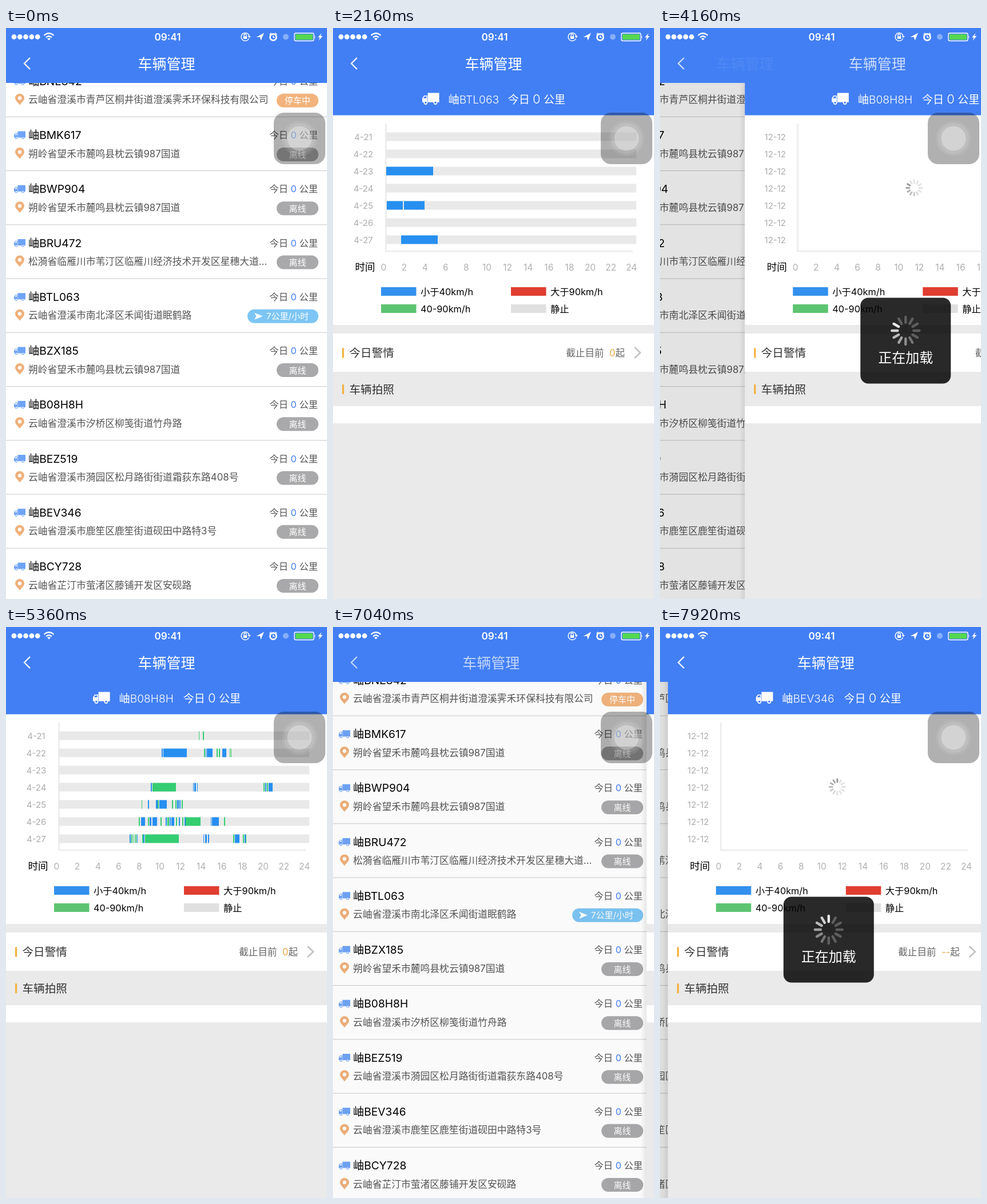
Animation of 561x998 px, one loop 8 s. Source, as an HTML page:

```html
<!DOCTYPE html>
<html lang="zh-CN">
<head>
<meta charset="utf-8">
<title>车辆管理</title>
<style>
html, body { margin: 0; width: 100%; height: 100%; overflow: hidden; background: #fff; }
svg { display: block; width: 100%; height: 100%; }
text { font-family: Inter, "Noto Sans CJK SC", "Noto Sans CJK", sans-serif; white-space: pre; }
</style>
</head>
<body>
<svg id="stage" viewBox="0 0 561 998">
  <defs>
    <linearGradient id="edge"><stop offset="0" stop-opacity="0"/><stop offset="1" stop-opacity=".08"/></linearGradient>
    <g id="truck">
      <path d="M6.500 0H20V11H6.500ZM0 6L2.200 3H6V11H0Z"/>
      <circle cx="4" cy="11.500" r="2.300"/><circle cx="15.500" cy="11.500" r="2.300"/>
    </g>
    <g id="gaps">
      <path d="M1.200 6.200L2.800 4H5V6.200Z"/>
      <circle cx="4" cy="11.500" r="1.200"/><circle cx="15.500" cy="11.500" r="1.200"/>
    </g>
    <g id="pin">
      <path d="M8 20C5 15.500 0 12 0 7.800A8 7.800 0 0 1 16 7.800C16 12 11 15.500 8 20Z" fill="#efb07a"/>
      <circle cx="8" cy="7.800" r="3.200" fill="#fff"/>
    </g>
  </defs>
  <g id="list"></g>
  <g id="page"></g>
  <g id="nav"></g>
  <g id="touch"></g>
</svg>
<script>
const W = 561, H = 998, LOOP = 8000, BLUE = '#427ff4', GREY = '#eaeaeb';
const LOAD_TIME = 1050, HUD_FADE = 200, RATE = 0.01625;

const cars = [
  ['岫BNE842', '云岫省澄溪市青芦区桐井街道澄溪霁禾环保科技有限公司', 'parked'],
  ['岫BMK617', '朔岭省望禾市麓鸣县枕云镇987国道'],
  ['岫BWP904', '朔岭省望禾市麓鸣县枕云镇987国道'],
  ['岫BRU472', '松漪省临雁川市苇汀区临雁川经济技术开发区星穗大道...'],
  ['岫BTL063', '云岫省澄溪市南北泽区禾闻街道眠鹤路', 'moving'],
  ['岫BZX185', '朔岭省望禾市麓鸣县枕云镇987国道'],
  ['岫B08H8H', '云岫省澄溪市汐桥区柳笺街道竹舟路'],
  ['岫BEZ519', '云岫省澄溪市漪园区松月路街街道霜荻东路408号'],
  ['岫BEV346', '云岫省澄溪市鹿笙区鹿笙街道砚田中路特3号'],
  ['岫BCY728', '云岫省芷汀市萤渚区藤铺开发区安砚路']
];

// Visits: car index, left edge of the header line, chart rows (colour, x, optional width)
const visits = [
  { car: 4, left: 156, rows: ['', '', 'b93,82', '', 'b94,28 b124,36', '', 'b119,64'] },
  { car: 6, left: 152, rows: [
    'g337,1 g344',
    'b272 b275,41 g346 b349,1 b351,10 g368 g372 b378,7 g391,1 g393,1',
    '',
    'b253 g256,41 b327,1 b329,3 b334,1 g450 b453 g456 b459,7',
    'g237,1 b248 b262,3 g265 b268,13 g290 g296 b299,3 b303 g307',
    'g232 b236,7 g248 b251,3 b256,8 g270 b279 g282,3 b286 b289,5 g297 b302 g308 b312 g314,26 b358,1 b360,12 g381',
    'b216 g219 g223,1 g226 b229,1 g238 b240 g243,59 b345,1 b348,3 b353 g397 b400,8 g414 b417 g419,1'
  ] },
  { car: 8, left: 154, rows: [] }
];

// Start time, 1 = open / 0 = go back, visit
const moves = [[708, 1, 0], [3200, 0, 0], [4000, 1, 1], [6693, 0, 1], [7577, 1, 2]];

const $ = id => document.getElementById(id);
const range = (n, f) => Array.from({ length: n }, (_, i) => f(i)).join('');
const rect = (x, y, w, h, fill, more = '') =>
  `<rect x="${x}" y="${y}" width="${w}" height="${h}" fill="${fill}" ${more}/>`;
const text = (x, mid, size, s, fill = '#000', more = '') =>
  `<text x="${x}" y="${mid + size * 0.37}" font-size="${size}" fill="${fill}" ${more}>${s}</text>`;
const MID = 'text-anchor="middle"', END = 'text-anchor="end"';
const truck = (x, y, k, fill, gaps) =>
  `<g transform="translate(${x} ${y}) scale(${k})"><use href="#truck" fill="${fill}"/><use href="#gaps" fill="${gaps}"/></g>`;

function pill(state, y) {
  if (state === 'moving') return rect(422, y - 12, 124, 24, '#7cc5f4', 'rx="12"') +
    `<path d="M434 ${y - 6}L449 ${y}L434 ${y + 6}L437.500 ${y}Z" fill="#fff"/>` + text(455, y, 15, '7公里/小时', '#fff');
  const parked = state === 'parked';
  return rect(473, y - 12, 73, 24, parked ? '#f2b37c' : '#a9a9ab', 'rx="12"') +
    text(509.500, y, 15, parked ? '停车中' : '离线', '#fff', MID);
}

function row([plate, address, state], i) {
  const y = 60.750 + 94.250 * i;
  return truck(14, y + 25.500, 1, '#6ea3f6', '#fff') + text(39, y + 32, 19.200, plate) +
    text(545, y + 32, 16.300, `今日 <tspan fill="${BLUE}">0</tspan> 公里`, '#555', END) +
    `<use href="#pin" x="16" y="${y + 54}"/>` + text(39, y + 64.500, 16.800, address, '#555') +
    pill(state, y + 66) + rect(0, y + 94, W, 1, '#c9c9cb');
}

const spokes = (cx, cy, r1, r2, w, color) =>
  `<g class="spin" transform="translate(${cx} ${cy})" stroke="${color}" stroke-width="${w}" stroke-linecap="round">` +
  range(12, i => `<line y1="${-r1}" y2="${-r2}" transform="rotate(${i * 30})"/>`) + '</g>';

function bars(line, y) {
  return rect(92, y - 7.500, 438, 15, '#e9e9e9') + line.split(' ').filter(Boolean).map(s => {
    const [x, w = 2] = s.slice(1).split(',');
    return rect(x, y - 7.500, w, 15, s[0] === 'b' ? '#268ff0' : '#34cd72');
  }).join('');
}

const legend = (x, y, fill, s) => rect(x, y - 7.500, 61.500, 15, fill) + text(x + 69, y, 16.300, s);
const section = (y, s) => rect(16, y - 8.500, 3.200, 17, '#f4b13e') + text(28.500, y, 19.600, s, '#333');

function pageMarkup({ car, left, rows }, loaded) {
  const white = (y, h) => rect(0, y, W, h, '#fff');
  return rect(-10, 96, 10, H, 'url(#edge)') + rect(0, 96, W, H - 96, GREY) +
    rect(0, 96, W, 57, BLUE) + white(152.500, 366.500) + white(534, 67) + white(661, 30) +
    truck(left, 113.500, 1.480, '#fff', BLUE) +
    text(left + 45.500, 124.500, 19.200, cars[car][0], '#fff', 'font-weight="300"') +
    text(562 - left, 125, 19, '今日 <tspan font-size="22">0</tspan> 公里', '#fff', END + ' font-weight="300"') +
    rect(91, 167, 3, 224, '#eee') + rect(91, 388.500, 433, 3, '#eee') +
    range(7, i => text(53, 190 + 30 * i, 15, loaded ? '4-' + (21 + i) : '12-12', '#adadad', MID) +
      (loaded ? bars(rows[i], 190 + 30 * i) : '')) +
    text(38.500, 418, 17.500, '时间') +
    range(13, i => text(88.500 + 36.100 * i, 418, 15.500, 2 * i, '#b0b0b0', MID)) +
    legend(84, 460.500, '#3390ee', '小于40km/h') + legend(311, 460.500, '#e03e31', '大于90km/h') +
    legend(84, 490.500, '#5dc471', '40-90km/h') + legend(311, 490.500, '#e0e0e0', '静止') +
    section(568, '今日警情') + section(631.500, '车辆拍照') +
    text(510, 568, 16.600, `截止目前 <tspan fill="#eba94b"> ${loaded ? '0' : '--'}</tspan>起`, '#666', END) +
    '<path d="M527 558L537 567.500L527 577" fill="none" stroke="#c2c2c4" stroke-width="2.600"/>' +
    (loaded ? '' : spokes(296, 279.500, 8.500, 13.500, 2.800, '#8a8a8a')) +
    '<g id="hud">' + rect(202, 471.500, 158, 150, '#000', 'rx="14" fill-opacity=".84"') +
    spokes(281, 529, 14, 24, 4.400, '#fff') +
    text(281, 576.500, 24, '正在加载', '#fff', MID + ' font-weight="500"') + '</g>';
}

$('list').innerHTML = rect(0, 96, W, H, '#fff') + cars.map(row).join('') +
  rect(0, 0, W, H, '#000', 'id="dim"');

$('nav').innerHTML = rect(0, 0, W, 96, BLUE) +
  '<path id="back" d="M42 52L32 62L42 72" fill="none" stroke="#fff" stroke-width="2.300"/>' +
  ['listTitle', 'pageTitle'].map(id =>
    text(280.500, 63, 25, '车辆管理', '#fff', `id="${id}" ${MID} font-weight="300"`)).join('') +
  range(5, i => `<circle cx="${14 + 10.300 * i}" cy="15.500" r="4.400" fill="#fff"/>`) +
  '<g fill="none" stroke="#fff" stroke-width="2.200"><path d="M66.500 13Q75 5.500 83.500 13M70 16.500Q75 12 80 16.500"/></g>' +
  '<path d="M72 18.500Q75 16.300 78 18.500L75 21.500Z" fill="#fff"/>' +
  text(282.500, 15.500, 17.200, '09:41', '#fff', MID + ' font-weight="600"') +
  '<g fill="none" stroke="#fff" stroke-width="1.400"><path d="M424.500 18.500A7 7 0 1 1 425 14"/>' +
  '<path d="M416 14.500V12.500A2 2 0 0 1 420 12.500V14.500"/><circle cx="467" cy="16" r="5.600" stroke-width="2.600"/>' +
  '<path d="M467 13V16.500H470M460.500 11.500L463.500 8.500M470.500 8.500L473.500 11.500"/>' +
  '<rect x="504" y="9" width="34" height="13.500" rx="2.500"/></g>' +
  '<path d="M414.800 14.500H421.200V19H414.800ZM422.500 14H428L425.200 17.500ZM451 8.500L445.500 22L444 16H437.500ZM551.500 9L545 16.500H548.500L546.500 22L553.500 14H549.700ZM539.500 13V18.500Q541.500 15.700 539.500 13Z" fill="#fff"/>' +
  rect(506, 11, 30, 9.500, '#55d84f') + '<circle cx="489" cy="15.500" r="5" fill="#86b0f8"/>';

$('touch').innerHTML = rect(468, 148, 90, 90, '#000', 'rx="18" fill-opacity=".31"') +
  [[31, .08], [27, .1], [21.500, .32]].map(([r, a]) =>
    `<circle cx="513" cy="193" r="${r}" fill="#fff" fill-opacity="${a}"/>`).join('');

const clamp = v => Math.max(0, Math.min(1, v));
const place = (el, x, opacity = 1) => {
  el.setAttribute('transform', `translate(${x} 0)`);
  el.setAttribute('opacity', opacity);
};
let shown = '';

function draw(t) {
  const [start, open, visit] = moves.filter(m => m[0] <= t).pop() || [-LOOP, 0, 0];
  const age = t - start, a = age * RATE;
  // Critically damped spring from 0 to 1
  const p = age > 700 ? 1 : 1 - (1 + a) * Math.exp(-a);
  const cover = open ? p : 1 - p, x = W * (1 - cover);
  const since = t - moves.find(m => m[1] && m[2] === visit)[0];
  const loaded = since > LOAD_TIME;

  const key = visit + '/' + loaded;
  if (key !== shown) {
    $('page').innerHTML = pageMarkup(visits[visit], loaded);
    shown = key;
  }
  place($('list'), -0.3 * W * cover);
  $('dim').setAttribute('opacity', 0.13 * Math.sqrt(cover));
  place($('page'), x);
  $('page').setAttribute('visibility', cover > 0 ? 'visible' : 'hidden');
  $('hud').setAttribute('opacity', clamp(1 - (since - LOAD_TIME) / HUD_FADE));

  const late = clamp((age - 150) / 290), early = 1 - p;
  place($('listTitle'), -179 * cover, open ? early ** 2 : late);
  place($('pageTitle'), x * (open ? 0.67 : 0.56), open ? p : early ** 1.6);
  $('back').setAttribute('opacity', open ? Math.max(1 - 3 * p, p) : Math.max(early, late));

  const head = Math.floor(since * 0.012 + 8.2);
  document.querySelectorAll('.spin').forEach(g => [...g.children].forEach((line, i) => {
    const behind = (((head - i) % 12) + 12) % 12;
    line.setAttribute('opacity', Math.max(0.25, 0.9 - behind * 0.11));
  }));
}

const begin = performance.now();
function tick() {
  draw((performance.now() - begin) % LOOP);
  requestAnimationFrame(tick);
}
tick();
</script>
</body>
</html>
```
